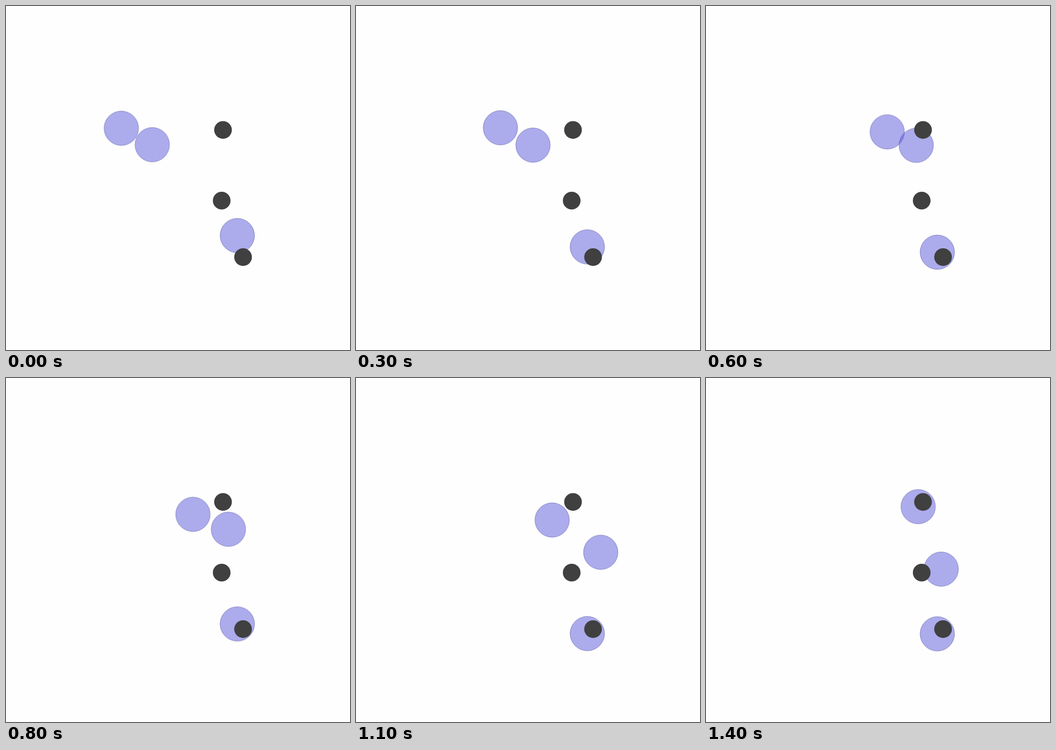
Write an HTML page without scripts that moves like this. It is 700x700 px and loops after 1500 ms.

```html
<!DOCTYPE html>
<html lang="en">
<head>
<meta charset="utf-8">
<title>Moving discs</title>
<style>
  html, body { margin: 0; width: 100%; height: 100%; overflow: hidden; background: #fefefe; }
  svg { display: block; width: 100%; height: 100%; }
  .disc { fill: #5b59da; fill-opacity: .5; stroke: #33338a; stroke-opacity: .5; }
  .goal { fill: #404040; }

  /* Straight runs between key points, in hard steps of 100 ms.
     The tiny negative delay keeps each step on its tick. */
  .disc circle { animation: 1.5s steps(2) -1ms infinite; }
  .disc .left { animation-name: left; }
  .disc .right { animation-name: right; }
  .disc .low { animation-name: low; }

  @keyframes left {
    0%     { transform: translate(234.6px, 248.7px); }
    13.33% { transform: translate(269px, 248px); }
    26.66% { transform: translate(318.7px, 247.6px); }
    40%    { transform: translate(368.7px, 256.2px); animation-timing-function: steps(3); }
    60%    { transform: translate(386.3px, 288px); animation-timing-function: steps(3); }
    80%    { transform: translate(405.5px, 289.5px); }
    93.33% { transform: translate(431.7px, 261.8px); animation-timing-function: steps(1); }
  }
  @keyframes right {
    0%     { transform: translate(297.6px, 282.2px); }
    13.33% { transform: translate(334.5px, 283px); }
    26.66% { transform: translate(385.8px, 283.2px); }
    40%    { transform: translate(427.8px, 283.5px); animation-timing-function: steps(3); }
    60%    { transform: translate(464.9px, 319.9px); }
    73.33% { transform: translate(498px, 354.6px); animation-timing-function: steps(1); }
    80%    { transform: translate(500px, 369px); }
    93.33% { transform: translate(478.6px, 388.9px); animation-timing-function: steps(1); }
  }
  @keyframes low {
    0%     { transform: translateY(467.1px); }
    13.33% { transform: translateY(485.1px); }
    26.66% { transform: translateY(495.2px); animation-timing-function: steps(1); }
    33.33% { transform: translateY(503px); animation-timing-function: steps(1); }
    40%    { transform: translateY(501px); animation-timing-function: steps(3); }
    60%    { transform: translateY(500.2px); animation-timing-function: steps(3); }
    80%    { transform: translateY(530px); }
    93.33% { transform: translateY(520.6px); animation-timing-function: steps(1); }
  }
</style>
</head>
<body>
<svg viewBox="0 0 700 700">
  <g class="disc">
    <circle class="left" r="35"/>
    <circle class="right" r="35"/>
    <circle class="low" cx="470.7" r="35"/>
  </g>
  <g class="goal">
    <circle cx="441.6" cy="252.2" r="18"/>
    <circle cx="438.9" cy="396" r="18"/>
    <circle cx="482.4" cy="510.9" r="18"/>
  </g>
</svg>
</body>
</html>
```
